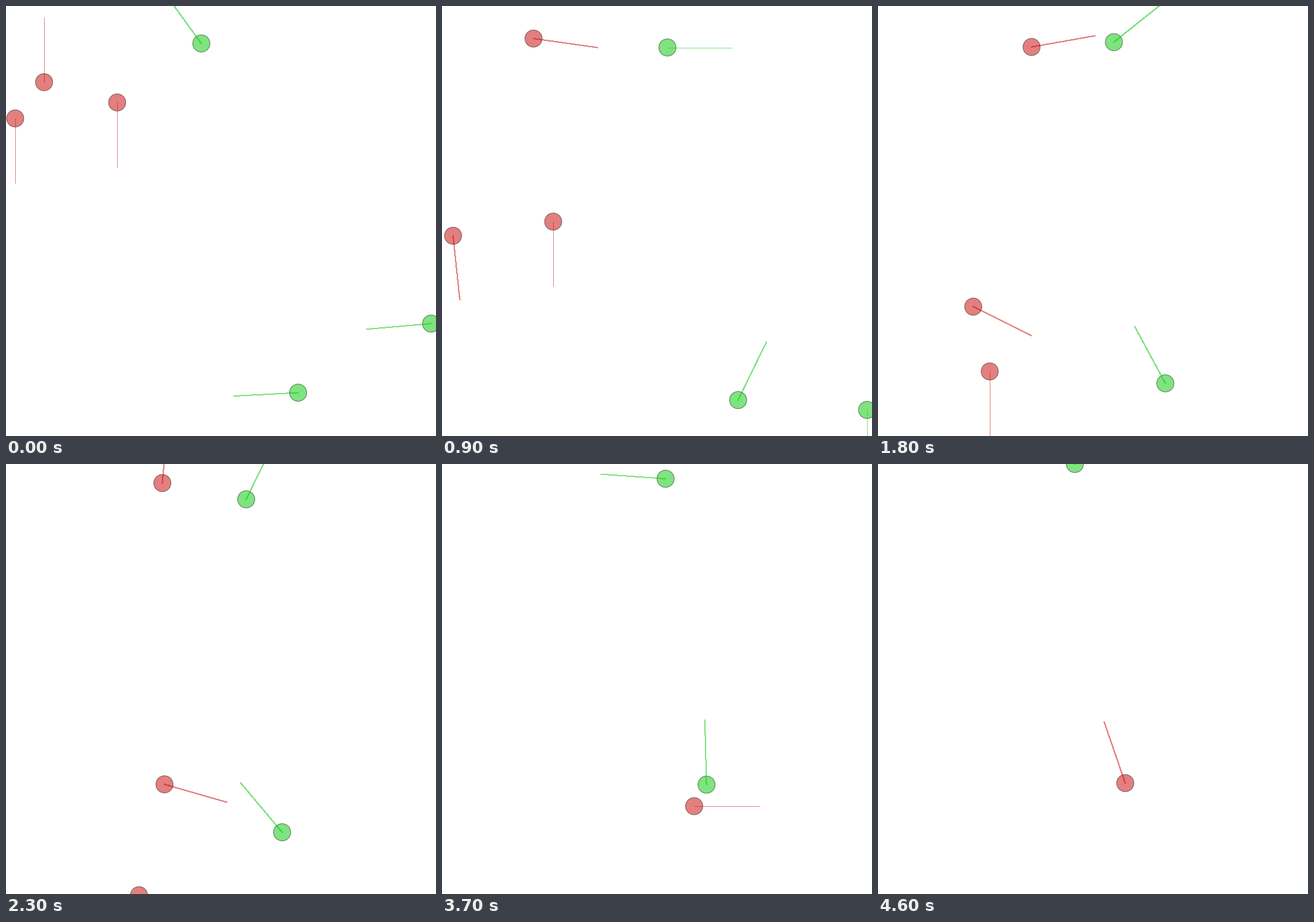
These frames come from a looping animation (700x700 px, 4700 ms). A matplotlib script:

```python
import matplotlib.pyplot as plt
import numpy as np
from matplotlib.animation import FuncAnimation
from matplotlib.patches import Circle

SIZE, DPI = 700, 100
FRAMES, STEP_MS = 47, 100
RADIUS, REACH = 14, 105
PX = 72 / DPI
FORWARD = np.radians(40)

RED, GREEN = "#c80000", "#00c800"


def travel(start, end, heading, turn, u):
    """Follow an arc that bends with the heading, or drift straight
    when the agent is not facing the way it moves."""
    bend = np.radians(turn)
    middle = np.exp(1j * (np.radians(heading) + bend / 2))
    off_course = abs(np.angle((end - start) / middle))
    if bend and off_course < FORWARD:
        u = np.expm1(1j * bend * u) / np.expm1(1j * bend)
    return start + (end - start) * u


def trace(pos, heading, *legs):
    """One (position, heading) per step; each leg is steps, goal, turn."""
    poses = [(pos, heading)]
    for steps, goal, turn in legs:
        for u in np.arange(1, steps + 1) / steps:
            poses.append((travel(pos, goal, heading, turn, u),
                          heading + turn * u))
        pos, heading = goal, heading + turn
    return poses


class Agent:
    def __init__(self, ax, color, pos, heading, *legs):
        self.poses = trace(pos, heading, *legs)
        self.body = ax.add_patch(Circle((0, 0), RADIUS, fc=color, ec="black",
                                        lw=PX, alpha=0.5, zorder=2))
        self.ray, = ax.plot([], [], color=color, lw=PX, alpha=0.5,
                            antialiased=False, zorder=3)

    def update(self, step):
        alive = step < len(self.poses)
        self.body.set_visible(alive)
        self.ray.set_visible(alive)
        if alive:
            pos, heading = self.poses[step]
            tip = pos + REACH * np.exp(1j * np.radians(heading))
            self.body.center = pos.real, pos.imag
            self.ray.set_data([pos.real, tip.real], [pos.imag, tip.imag])


fig = plt.figure(figsize=(SIZE / DPI, SIZE / DPI), dpi=DPI, facecolor="white")
ax = fig.add_axes([0, 0, 1, 1])
ax.set_xlim(0, SIZE)
ax.set_ylim(SIZE, 0)
ax.axis("off")

# Positions are x + yj with y downwards; headings turn clockwise in degrees.
agents = [
    Agent(ax, RED, 62 + 124j, -90,
          (9, 149 + 53j, 98), (5, 221.5 + 74.5j, 42),
          (9, 254.5 + 31j, -135), (3, 252 - 24j, -10)),
    Agent(ax, RED, 15 + 183j, 90,
          (9, 18 + 374j, -6), (5, 78 + 450.5j, -49), (9, 258 + 521.5j, -19),
          (4, 340 + 544j, 14), (4, 380 + 553j, 134), (6, 410.5 + 557j, 196),
          (5, 424 + 556j, -64), (4, 402.5 + 519.5j, -45)),
    Agent(ax, RED, 181 + 157j, 90,
          (9, 181 + 351j, 0), (10, 182 + 622j, 0),
          (4, 216.5 + 702j, -60), (2, 258 + 722j, 0)),
    Agent(ax, GREEN, 318 + 61j, -126,
          (9, 367 + 67.5j, -234), (5, 352 + 56.5j, -112),
          (6, 400 + 60j, 110), (3, 391 + 57.5j, -62), (8, 377 + 37j, -75),
          (6, 364 + 24j, -37), (9, 320.5 + 0j, 56)),
    Agent(ax, GREEN, 475.5 + 629.5j, 177,
          (9, 482 + 641.5j, -241), (5, 480 + 628.5j, -45),
          (9, 449.5 + 599.5j, -21), (8, 430 + 567j, 38.5),
          (10, 431 + 492j, 0)),
    Agent(ax, GREEN, 692 + 517j, 175,
          (9, 692 + 657.5j, -85), (4, 692 + 727j, 0)),
]


def draw(step):
    for agent in agents:
        agent.update(step)
    return [part for a in agents for part in (a.body, a.ray)]


anim = FuncAnimation(fig, draw, frames=FRAMES, interval=STEP_MS,
                     repeat=True, repeat_delay=0)
plt.show()
```
